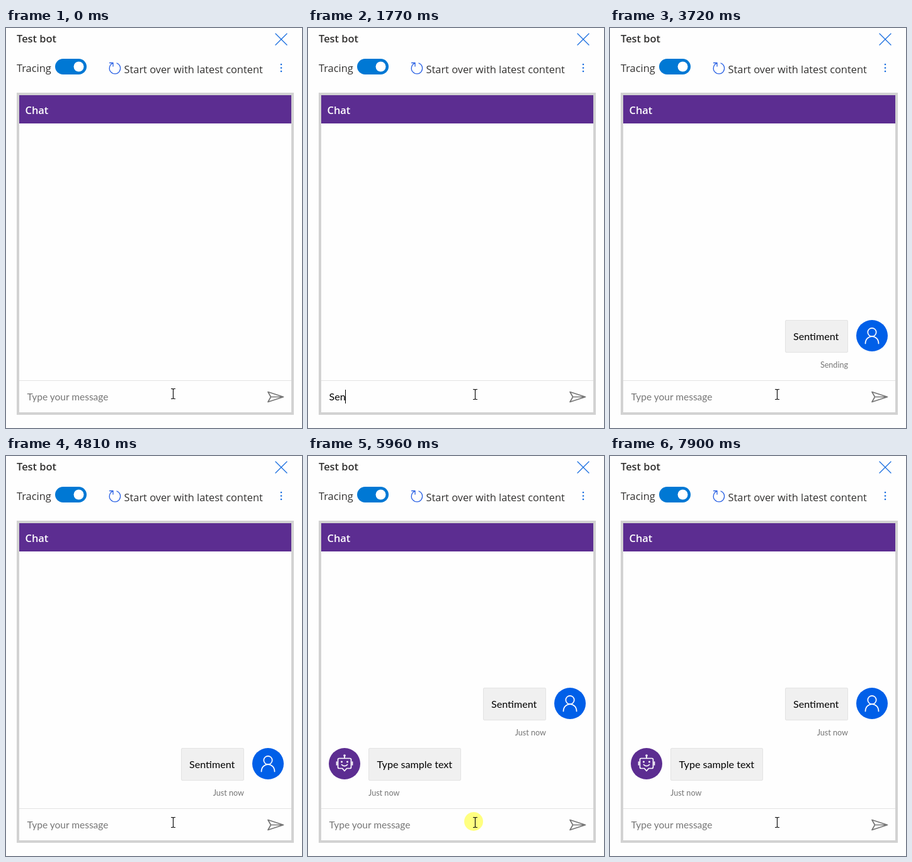
Write an HTML page that moves like this. It is 470 px wide and 637 px high and loops after 8000 ms.

```html
<!DOCTYPE html>
<html lang="en">
<head>
<meta charset="utf-8">
<title>Chat test panel</title>
<style>
  html, body { margin: 0; width: 100%; height: 100%; overflow: hidden; background: #fefefe; }
  svg { display: block; }
  text { white-space: pre; }
  .ui { font: 16.4px "Open Sans", sans-serif; fill: #323130; }
  .bold { font-weight: 600; }
  .msg { font: 16.1px Lato, sans-serif; fill: #000; }
  .hint { font: 15.5px Lato, sans-serif; fill: #767676; }
  .note { font: 12.6px Lato, sans-serif; fill: #767676; }
  .end { text-anchor: end; }
  .line { fill: none; stroke-linecap: round; stroke-linejoin: round; }
  .bubble { fill: #f0f0f0; stroke: #e3e3e3; }
</style>
</head>
<body>
<svg width="470" height="637" viewBox="0 0 470 637">
  <rect width="470" height="637" fill="#fefefe"/>

  <!-- Toolbar -->
  <text class="ui bold" x="17" y="22.5">Test bot</text>
  <path class="line" d="M428 9l18 18M446 9l-18 18" stroke="#1a6fe0" stroke-width="1.3"/>
  <text class="ui" x="17" y="70">Tracing</text>
  <rect x="78" y="49" width="50" height="25" rx="12.5" fill="#0078d4"/>
  <circle cx="115.5" cy="61.5" r="8" fill="#fff"/>
  <path class="line" d="M176 56a8.7 8.7 0 1 1-7 .4M164.5 55.5h5.500v5.500" stroke="#2b62e4" stroke-width="1.3"/>
  <text class="ui" x="187.500" y="71.500">Start over with latest content</text>
  <g fill="#1a6fe0">
    <circle cx="437" cy="58" r="1.300"/>
    <circle cx="437" cy="63.500" r="1.300"/>
    <circle cx="437" cy="69" r="1.300"/>
  </g>

  <!-- Chat window -->
  <rect x="19" y="105" width="436" height="509" fill="#fefefe" stroke="#d2d2d2" stroke-width="4"/>
  <rect x="21" y="107" width="432" height="45" fill="#5c2d91"/>
  <text class="ui bold" x="30.500" y="136.500" style="fill:#fff">Chat</text>
  <path d="M21 561.500h432" stroke="#e3e3e3"/>
  <path class="line" d="M416 579.500l24.500 8-24.500 8 4.500-8zM420.500 587.500h20" stroke="#767676" stroke-width="1.700"/>

  <!-- User message, placed relative to its bubble top -->
  <g id="user">
    <rect class="bubble" x="278.500" y=".5" width="99" height="51" rx="1.500"/>
    <text class="msg" x="291" y="32">Sentiment</text>
    <circle cx="416" cy="25" r="25" fill="#005fe8"/>
    <g class="line" stroke="#fff" stroke-width="1.700">
      <circle cx="416" cy="19.500" r="6.700"/>
      <path d="M405.500 37.500c0-15 21-15 21 0"/>
    </g>
    <text class="note end" id="status" x="378" y="76"></text>
  </g>

  <!-- Bot reply -->
  <g id="bot">
    <g id="botAvatar">
      <circle cx="58" cy="490" r="25" fill="#5c2d91"/>
      <g class="line" stroke="#fff" stroke-width="1.700">
        <path d="M49.500 481.500h17a2 2 0 0 1 2 2v12a2 2 0 0 1-2 2h-5l-3.500 4-3.500-4h-5a2 2 0 0 1-2-2v-12a2 2 0 0 1 2-2zM58 481v-3M45.500 487v5M70.500 487v5"/>
        <path d="M53.500 491.500q4.500 4.500 9 0"/>
      </g>
      <g fill="#fff">
        <circle cx="58" cy="477" r="1.800"/>
        <circle cx="53.500" cy="487" r="1.500"/>
        <circle cx="62.500" cy="487" r="1.500"/>
      </g>
    </g>
    <g id="typing">
      <rect x="96" y="480" width="80" height="25" fill="#eceff1"/>
      <circle cx="116.500" cy="494.500" r="5.300"/>
      <circle cx="136" cy="494.500" r="5.300"/>
      <circle cx="152.500" cy="494.500" r="5.300"/>
    </g>
    <g id="reply">
      <rect class="bubble" x="96.500" y="465.500" width="146" height="51" rx="1.500"/>
      <text class="msg" x="109.500" y="497">Type sample text</text>
    </g>
    <text class="note" x="96" y="541">Just now</text>
  </g>

  <!-- Input and pointer -->
  <text class="hint" id="hint" x="33.500" y="593">Type your message</text>
  <text class="msg" id="typed" x="33.500" y="593"></text>
  <path id="caret" d="M.5 576v22" stroke="#000"/>
  <g id="pointer">
    <circle id="click" cx="263" cy="-1" r="15" fill="#ffff80"/>
    <path d="M262 -7.500h2.500l1 1 1-1h2.500M262 8.500h2.500l1-1 1 1h2.500M265.500 -6.500v14" fill="none" stroke="#111" stroke-width="1.200"/>
  </g>
</svg>
<script>
const DURATION = 8000;
const WORD = "Sentiment";
const TYPE_START = 1310, KEY_INTERVAL = 166;
const SENT = 3170, DELIVERED = 3950, BOT_TYPING = 4960, REPLY = 5190;
const CARET_TOGGLES = [310, 850, 1310, 3720, 4260, 4810, 5350, 5960, 6360, 6890, 7440, 7900];
const DOT_GREYS = ["#c6c9cb", "#a3a6a8", "#6f7072"];

const el = id => document.getElementById(id);
const show = (id, on) => el(id).setAttribute("visibility", on ? "visible" : "hidden");
const move = (id, x, y) => el(id).setAttribute("transform", `translate(${x} ${y})`);
const within = (t, from, to) => t >= from && t < to;

function draw(t) {
  const count = within(t, TYPE_START, SENT)
    ? Math.min(WORD.length, 1 + Math.floor((t - TYPE_START) / KEY_INTERVAL)) : 0;
  const typed = el("typed");
  typed.textContent = WORD.slice(0, count);
  show("hint", !count);

  show("caret", CARET_TOGGLES.filter(time => time <= t).length % 2);
  move("caret", count ? Math.round(33 + typed.getComputedTextLength()) : 33, 0);

  move("pointer", 0, t < 770 ? 582 : 583);
  show("click", within(t, 310, 460) || within(t, 5810, 6130));

  show("user", t >= SENT);
  move("user", 0, t < BOT_TYPING ? 465 : t < REPLY ? 371 : 369);
  el("status").textContent = t < SENT ? "" : t < DELIVERED ? "Sending" : "Just now";

  const replied = t >= REPLY;
  el("bot").style.display = t >= BOT_TYPING ? "" : "none";
  move("botAvatar", 0, replied ? 0 : 2);
  show("typing", t >= BOT_TYPING && !replied);
  show("reply", replied);
  const shift = t < 5040 ? 0 : 1;
  document.querySelectorAll("#typing circle").forEach((dot, i) =>
    dot.setAttribute("fill", DOT_GREYS[(i + shift) % 3]));
}

const start = performance.now();
function frame() {
  draw((performance.now() - start) % DURATION);
  requestAnimationFrame(frame);
}
frame();
</script>
</body>
</html>
```
